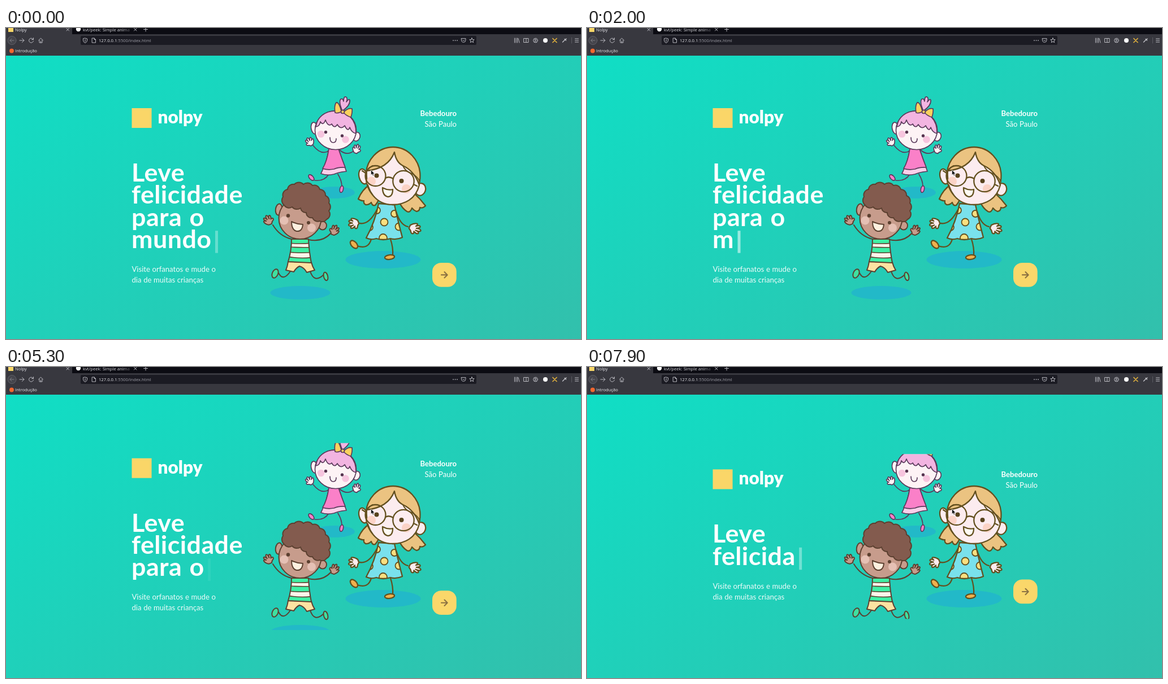
These frames come from a looping animation (1017 px wide and 551 px high, 8000 ms). An HTML page:

```html
<!DOCTYPE html>
<html lang="pt">
<head>
<meta charset="utf-8">
<title>Nolpy</title>
<style>
html, body { margin: 0; width: 100%; height: 100%; overflow: hidden; background: #0c0c13; }
#page { position: absolute; left: 0; top: 49px; width: 1017px; height: 502px;
  background: linear-gradient(329.54deg, #32c0ac 0%, #10dec5 100%); }
svg { position: absolute; left: 0; top: 0; }
text { font-family: Lato, "Open Sans", sans-serif; fill: #fff; white-space: pre; }
.ui text { font: 7.65px "Open Sans", "Noto Sans", sans-serif; fill: #e8e8ec; }
.icon { fill: none; stroke: #c8c8ce; stroke-width: .9; stroke-linecap: round; stroke-linejoin: round; }
.body { font-size: 13.1px; word-spacing: .3px; }
#title text { font-size: 44.8px; font-weight: 700; letter-spacing: .45px; word-spacing: 2px; }
#art g { stroke-linecap: round; stroke-linejoin: round; }
#hand { vector-effect: non-scaling-stroke; }
</style>
</head>
<body>
<div id="page"></div>
<svg width="1017" height="551" viewBox="0 0 1017 551">
  <defs>
    <path id="hand" d="M-3 7Q-5 3-9 1Q-11-3-6-3L-5-2Q-8-9-5-10Q-2-10-2-4Q-2-12 1-12Q4-11 2-4Q6-11 8-8Q9-6 5-2Q10-5 10-2Q9 3 3 7Z"/>
    <clipPath id="window"><rect id="frame" x="440" width="320"/></clipPath>
    <clipPath id="shirt"><path d="M505 374L535 374Q536 396 540 416L499 414Q505 395 505 374Z"/></clipPath>
    <clipPath id="dress"><path d="M659 311L687 313Q694 345 701 371Q690 376 680 373Q667 377 655 373Q645 376 637 372Q653 343 659 311Z"/></clipPath>
    <linearGradient id="fade" gradientUnits="userSpaceOnUse" x1="205" x2="222">
      <stop stop-color="#d8d8dd"/><stop offset="1" stop-color="#d8d8dd" stop-opacity=".15"/>
    </linearGradient>
  </defs>

  <g class="ui">
    <rect width="1017" height="12" fill="#0c0c13"/>
    <rect y="11" width="1017" height="38" fill="#38383f"/>
    <rect width="117" height="12" fill="#38383f"/>
    <rect x="4" y="-2" width="9" height="9" fill="#fad668"/>
    <text x="16" y="5.500">Nolpy</text>
    <circle cx="128" cy="2" r="4.200" fill="#fff"/>
    <text x="136" y="5.500" style="fill:url(#fade)">kvt/peek: Simple anima</text>
    <g class="icon">
      <path d="M107 .5l4.500 4.500m0-4.500L107 5M226.500 .5l4.500 4.500m0-4.500L226.500 5M243.500 2.500h7m-3.500-3.500v7"/>
      <circle cx="10.500" cy="22" r="7.500" fill="#45454c" stroke="#66666d"/>
      <path stroke="#85858c" d="M14 22H7m3-3-3 3 3 3"/>
      <path d="M24 22h8m-3.500-3.500L32 22l-3.500 3.500M48 20a4 4 0 1 0 .5 3M48.500 17.500v3h-3M57.500 22l4-4 4 4M59 21.500V26h5v-4.500M61.500 26v-2.500"/>
    </g>
    <rect x="132" y="14" width="700" height="16" rx="2" fill="#1b1b23"/>
    <text x="164" y="24.700">127.0.0.1<tspan fill="#a0a0a8">:5500/index.html</tspan></text>
    <g class="icon">
      <path d="M140 18l3.500 1v3q0 3-3.500 4.500-3.500-1.500-3.500-4.500v-3zM140 20v4M152.500 18h3.500l2.500 2.500V26h-6zM156 18v2.500h2.500"/>
      <path d="M791 22h.1M794.500 22h.1M798 22h.1" stroke-width="1.700"/>
      <path d="M805.500 18.500h7.500v3a3.700 3.700 0 0 1-7.500 0zM807.500 21l1.800 1.800 1.800-1.800M824 17.700l1.200 2.800 3 .2-2.300 2 .8 3-2.700-1.700-2.700 1.700.8-3-2.300-2 3-.2z"/>
      <path d="M899.500 18v8M902 18v8M904.500 18v8M906 18.500l2 7.500M916 18.500h8v7h-8zM920 18.500v7"/>
      <circle cx="936.500" cy="22" r="3.800"/><circle cx="936.500" cy="21" r="1.300"/><path d="M934.500 24.500q2-2 4 0"/>
      <path d="M967 18.500l7 7m0-7-7 7" stroke="#e2b13e" stroke-width="1.700"/>
      <path d="M984.500 25l4-4M988 19.500l2.500 2.500M989.500 20.500l1.500-1.500" stroke-width="1.300"/>
      <path d="M1000.500 17v10" stroke="#606068"/>
      <path d="M1006.500 19h6M1006.500 22h6M1006.500 25h6"/>
    </g>
    <circle cx="954" cy="22" r="4" fill="#fff"/>
    <circle cx="10" cy="40.500" r="3.900" fill="#f2672f"/>
    <text x="16" y="43.300">Introdução</text>
  </g>

  <g id="site">
    <g id="art" clip-path="url(#window)">
      <g fill="#22b9c8">
        <ellipse cx="520.500" cy="469" rx="53" ry="12"/>
        <ellipse cx="581" cy="291.500" rx="36" ry="10.500"/>
        <ellipse cx="667" cy="410.500" rx="66.500" ry="15.500"/>
      </g>

      <!-- girl in pink -->
      <g stroke="#5a3a5b" stroke-width="1.700" fill="none">
        <path d="M572 217Q558 227 543 208M590 216Q602 227 615 218M571 259Q563 272 546 270M587 259Q594 270 594 281"/>
        <g fill="#f97fc8">
          <ellipse cx="540" cy="265" rx="6.300" ry="3.400" transform="rotate(48 540 265)"/>
          <ellipse cx="593.500" cy="285.500" rx="3" ry="6" transform="rotate(12 593.500 285.500)"/>
        </g>
        <path d="M571 214L588 214Q595 234 602 254Q590 255 580 259Q568 262 557 258Q568 236 571 214Z" fill="#fad0ea"/>
        <path d="M571 214L588 214Q594 232 600 247Q589 246 580 250Q569 252 560 249Q568 236 571 214Z" fill="#fa80c8"/>
        <g fill="#fdf3f5">
          <use href="#hand" transform="translate(538 203) rotate(-38) scale(.8)"/>
          <use href="#hand" transform="translate(620 216) rotate(18) scale(-.75 .85)"/>
          <ellipse cx="545.500" cy="177.500" rx="5.800" ry="10.500" transform="rotate(-10 545.500 177.500)"/>
          <ellipse cx="620" cy="192.500" rx="6" ry="8" transform="rotate(20 620 192.500)"/>
          <ellipse cx="583" cy="181" rx="36.500" ry="34.500"/>
        </g>
        <path d="M548 175C550 158 564 147 583 147C604 148 620 162 619 187Q611 185 608 176Q605 185 599 173Q592 181 586 171Q581 179 576 170Q570 176 565 163Q561 174 556 166Q555 174 548 175Z" fill="#f2b4e1"/>
        <path d="M595 147Q588 131 592 126Q596 124 597 130Q597 121 601 122Q605 124 602 131Q607 124 608 128Q609 137 595 147Z" fill="#f2b4e1"/>
        <g fill="#fbd15e">
          <path d="M593 147Q589 131 584 132Q580 138 582 150Q587 152 593 148Z"/>
          <path d="M598 148Q606 141 612 143Q613 149 610 158Q603 156 598 151Z"/>
          <circle cx="595.500" cy="148.500" r="3"/>
        </g>
        <path d="M573 194Q573 203 579 203Q584 203 584 196"/>
        <g stroke="none">
          <g fill="#f6c5de"><circle cx="557" cy="188" r="6.300"/><circle cx="600.500" cy="197.500" r="6.300"/></g>
          <g fill="#56344f"><circle cx="565.500" cy="184.500" r="2.700"/><circle cx="594.500" cy="191" r="2.700"/></g>
        </g>
      </g>

      <!-- boy -->
      <g stroke="#5c4030" stroke-width="2" fill="none">
        <path d="M505 374Q484 369 472 349M535 375Q560 380 574 364M503 431Q490 450 482 434M538 431Q545 453 562 437"/>
        <g fill="#3fe0a0">
          <ellipse cx="476" cy="435" rx="5" ry="8.200" transform="rotate(24 476 435)"/>
          <ellipse cx="565.500" cy="440" rx="3.600" ry="7.500" transform="rotate(-14 565.500 440)"/>
        </g>
        <path d="M499 414L540 415Q542 423 546 429L532 433Q527 424 519 422Q513 425 509 432L495 429Q498 422 499 414Z" fill="#fde3a2"/>
        <g clip-path="url(#shirt)">
          <path d="M490 365h60v60h-60z" fill="#3ff0a5"/>
          <g fill="#fcf5ea" stroke-width="1.600">
            <path d="M490 380Q520 384 550 380V388Q520 390 490 387Z"/>
            <path d="M490 396Q520 400 550 397V405Q520 411 490 403Z"/>
          </g>
        </g>
        <path d="M505 374L535 374Q536 396 540 416L499 414Q505 395 505 374Z"/>
        <g fill="#c79c8c">
          <use href="#hand" transform="translate(465 342) rotate(-22) scale(-.9 .9)"/>
          <use href="#hand" transform="translate(580 360) rotate(20) scale(.85 .95)"/>
          <ellipse cx="482.500" cy="321.500" rx="5.700" ry="10" transform="rotate(8 482.500 321.500)"/>
          <ellipse cx="560" cy="350" rx="7" ry="7.500"/>
          <ellipse cx="520" cy="337" rx="37.500" ry="37"/>
        </g>
        <path d="M492 314A11 11 0 0 1 490 299A10 10 0 0 1 498 286A10 10 0 0 1 510 277A11 11 0 0 1 526 277A11 11 0 0 1 542 279A10 10 0 0 1 555 286A10 10 0 0 1 565 297A10 10 0 0 1 571 310A10 10 0 0 1 571 324A10 10 0 0 1 567 339A9 9 0 0 1 555 342A10 10 0 0 1 542 336A9 9 0 0 1 531 327A9 9 0 0 1 521 319A11 11 0 0 1 506 317A10 10 0 0 1 492 314Z" fill="#835b4e"/>
        <path d="M505 343Q515 348 525 348Q524 361 514 360Q505 358 505 343Z" fill="#fdf0df"/>
        <g stroke="none">
          <g fill="#e5c0b4"><circle cx="492" cy="341" r="7.500"/><circle cx="540.500" cy="354" r="7.500"/></g>
          <g fill="#5c4030"><circle cx="499" cy="332.500" r="3.200"/><circle cx="535" cy="345" r="3"/></g>
        </g>
      </g>

      <!-- girl with glasses -->
      <g stroke="#63501f" stroke-width="2.300" fill="none">
        <path d="M656 322Q642 349 626 346M690 325Q697 349 711 352M646 374Q641 393 621 386M680 374Q685 389 684 403"/>
        <g fill="#f0b04d">
          <ellipse cx="615.500" cy="383.500" rx="8.300" ry="4.800" transform="rotate(48 615.500 383.500)"/>
          <ellipse cx="678.500" cy="406" rx="8.700" ry="4" transform="rotate(-8 678.500 406)"/>
        </g>
        <g clip-path="url(#dress)">
          <path d="M630 305h80v75h-80z" fill="#79e1ec"/>
          <g fill="#f9df80" stroke-width="1.800">
            <circle cx="656" cy="323" r="6"/><circle cx="687" cy="329" r="6"/>
            <circle cx="669" cy="344" r="6.500"/><circle cx="643" cy="353" r="6"/>
            <circle cx="695" cy="352" r="6.500"/><circle cx="667" cy="372" r="7"/>
          </g>
        </g>
        <path d="M659 311L687 313Q694 345 701 371Q690 376 680 373Q667 377 655 373Q645 376 637 372Q653 343 659 311Z"/>
        <g fill="#ebc381">
          <path d="M643 278Q630 286 623 303Q629 307 633 306Q632 311 636 313Q641 314 646 309Q648 316 653 314Q660 306 661 297Z"/>
          <path d="M722 293Q733 303 742 315Q737 320 732 318Q732 324 726 325Q721 323 718 319Q715 328 709 325Q700 319 696 309Z"/>
        </g>
        <g fill="#fcecef">
          <use href="#hand" transform="translate(617 346) rotate(-112) scale(1 .95)"/>
          <use href="#hand" transform="translate(721 355) rotate(112) scale(-1 1.100)"/>
          <ellipse cx="632" cy="263" rx="7.500" ry="13.500" transform="rotate(-14 632 263)"/>
          <ellipse cx="733" cy="286" rx="9" ry="11" transform="rotate(18 733 286)"/>
        </g>
        <ellipse cx="684.500" cy="262" rx="48" ry="51" fill="#ebc381"/>
        <path d="M638 253Q676 249 687 220Q690 238 702 244Q722 253 731 278C725 303 705 313 684 313C656 313 635 290 638 253Z" fill="#fcecef"/>
        <g fill="#fbd3c6" stroke="none"><circle cx="646" cy="271.500" r="8"/><circle cx="708" cy="285" r="8"/></g>
        <path d="M702 244Q707 255 718 258Q728 263 732 272M638 253Q643 247 648 244" stroke-width="1.900"/>
        <circle cx="653.500" cy="262" r="18"/>
        <circle cx="703" cy="271.500" r="18.700"/>
        <path d="M671 266Q677 262 685 267M636 257L630 253M721 277L727 280"/>
        <path d="M666 283Q675 288 684 286Q684 299 675 299Q666 297 666 283Z" fill="#fffaf3"/>
        <g fill="#57431d" stroke="none"><circle cx="655.500" cy="261.500" r="4"/><circle cx="699.500" cy="271" r="4"/></g>
      </g>
    </g>

    <g id="logo">
      <rect x="222.500" y="142" width="35" height="35" fill="#fad668"/>
      <text x="268.500" y="169" font-size="31.500" font-weight="900">nolpy</text>
    </g>
    <g id="place" class="body" text-anchor="end">
      <text x="797" y="156" font-weight="700">Bebedouro</text>
      <text x="797" y="175">São Paulo</text>
    </g>
    <g id="title">
      <text x="222"></text><text x="222"></text><text x="222"></text><text x="222"></text>
      <rect id="caret" width="5" height="39.400" fill="#fff"/>
    </g>
    <g id="intro" class="body" fill-opacity=".93">
      <text x="222.500" y="432">Visite orfanatos e mude o</text>
      <text x="222.500" y="451">dia de muitas crianças</text>
    </g>
    <g id="go">
      <rect x="754" y="416" width="42.700" height="42.700" rx="15.500" fill="#fad76a"/>
      <path d="M770 437.400H780.500M775.500 432.200L780.700 437.400L775.500 442.600" fill="none" stroke="#8c7242" stroke-width="2.100" stroke-linecap="round" stroke-linejoin="round"/>
    </g>
  </g>
  <path d="M645.500 251.500V260.500L647.600 258.700L649 261.800L650.600 261L649.200 258.200H652Z" fill="#111" stroke="#fff" stroke-width=".6"/>
</svg>
<script>
const LOOP = 8000, STEP = 100, KEY = 75, BLINK = 800, LINE = 39.4;
const PHRASE = 'Leve felicidade para o mundo';
// page cleared at, shown again at, first key at
const LOADS = [[-4000, -4000, -3025], [300, 400, 212], [3600, 3700, 3660], [7100, 7400, 6960]];
const $ = id => document.getElementById(id);
const rows = [...document.querySelectorAll('#title text')];

const ease = x => 1 - (1 - Math.min(1, Math.max(0, x))) ** 2.3;

function wrap(text) {
  const lines = [''];
  for (const word of text.match(/\S+\s*/g) || []) {
    const last = lines.length - 1;
    if (lines[last] && (lines[last] + word).trimEnd().length > 7) lines.push(word);
    else lines[last] += word;
  }
  return lines;
}

function rise(id, shift, age, delay) {
  const p = ease((age + 55 - delay) / 500);
  $(id).setAttribute('transform', `translate(0 ${shift + (1 - p) * 9})`);
  $(id).setAttribute('opacity', p);
}

function draw(t) {
  const [, shown, start] = LOADS.filter(l => l[0] <= t).pop();
  $('site').style.visibility = t < shown ? 'hidden' : 'visible';

  const age = t - start;
  const count = Math.max(0, Math.floor(age / KEY) + 1);
  const lines = wrap(PHRASE.slice(0, count));
  const shift = (4 - lines.length) * LINE / 2;

  rows.forEach((row, i) => {
    row.textContent = lines[i] || '';
    row.setAttribute('y', 272 + i * LINE);
  });
  const last = lines.length - 1;
  const end = lines[last] ? rows[last].getComputedTextLength() : 0;
  $('caret').setAttribute('x', 228.5 + end);
  $('caret').setAttribute('y', 241 + last * LINE);
  $('caret').setAttribute('opacity', (1 - Math.cos((age + 25) / BLINK * 2 * Math.PI)) / 2);

  $('frame').setAttribute('y', 115 + shift);
  $('frame').setAttribute('height', 370.6 - 2 * shift);
  rise('logo', shift, age, 0);
  rise('place', shift, age, 0);
  rise('title', shift, age, 100);
  rise('intro', -shift, age, 200);
  rise('go', -shift, age, 300);
}

function tick() {
  draw(Math.floor(performance.now() % LOOP / STEP) * STEP);
  requestAnimationFrame(tick);
}
tick();
</script>
</body>
</html>
```
